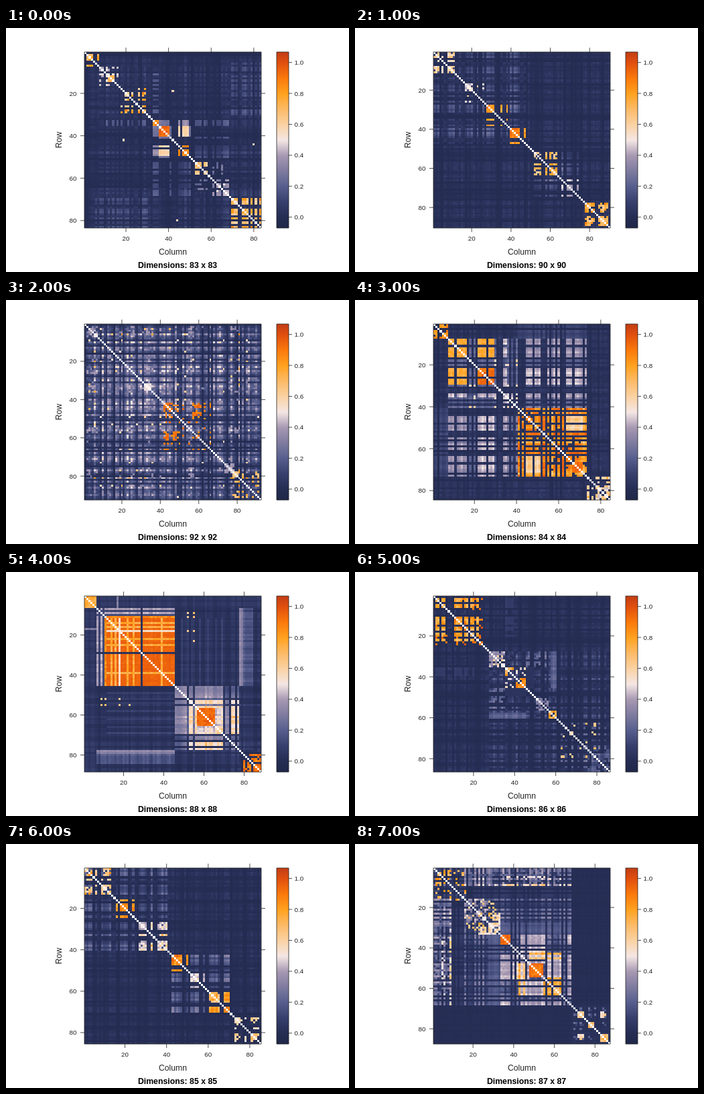
An HTML page with a canvas for the animation above (8000 ms loop, 512 by 366 pixels).

```html
<!DOCTYPE html>
<html lang="en">
<head>
<meta charset="utf-8">
<title>Matrix heatmaps</title>
<style>
html, body { margin: 0; width: 100%; height: 100%; overflow: hidden; background: #fff; }
canvas, svg { position: absolute; left: 0; top: 0; }
text { font: 9.8px "Liberation Sans", Arial, sans-serif; fill: #222; }
.mid { text-anchor: middle; }
.end { text-anchor: end; }
.name { font-size: 12.2px; }
.title { font-size: 12.3px; font-weight: bold; fill: #000; }
path { fill: none; stroke: #222; stroke-width: .8; }
</style>
</head>
<body>
<canvas id="cells" width="512" height="366"></canvas>
<svg id="axes" width="512" height="366"></svg>
<script>
const LEFT = 117, TOP = 36, SIZE = 264, HOLD = 1000;
const ctx = document.getElementById('cells').getContext('2d');
const axes = document.getElementById('axes');

// value, red, green, blue
const RAMP = [
  [-.07, 32, 39, 72], [0, 36, 44, 82], [.1, 54, 63, 108], [.2, 86, 94, 141], [.4, 166, 152, 178],
  [.5, 244, 230, 228], [.6, 250, 210, 164], [.7, 252, 187, 104], [.8, 255, 162, 32],
  [.9, 250, 122, 12], [1, 225, 80, 14], [1.07, 195, 61, 20]
];

function color(v) {
  v = Math.max(-.07, Math.min(1.07, v));
  const k = Math.max(1, RAMP.findIndex(s => v <= s[0]));
  const a = RAMP[k - 1], b = RAMP[k], t = (v - a[0]) / (b[0] - a[0]);
  return `rgb(${[1, 2, 3].map(c => Math.round(a[c] + (b[c] - a[c]) * t))})`;
}

function hash(a, b, seed) {
  const x = Math.sin(a * 12.9898 + b * 78.233 + seed * 37.719) * 43758.5453;
  return x - Math.floor(x);
}

// "2-4 7" -> [2, 3, 4, 7]
function indices(text) {
  return text.split(' ').flatMap(part => {
    const [from, to = from] = part.split('-').map(Number);
    return Array.from({ length: to - from + 1 }, (_, k) => from + k);
  });
}

// Symmetric matrix; fill() paints a block, "spread" dims it by row and column stripes.
function matrix(n, seed, build) {
  const m = Array.from({ length: n + 1 }, () => new Float32Array(n + 1));
  let layer = 0;
  const fill = (rows, cols, value, spread = .08, keep = 1, grain = .1) => {
    layer++;
    const dim = i => 1 - spread * hash(i, 0, seed);
    for (const i of indices(rows)) for (const j of indices(cols)) {
      const a = Math.min(i, j), b = Math.max(i, j);
      if (b > n || hash(a, b, seed + layer) > keep) continue;
      const noise = 1 + grain * (hash(b, a, seed + layer + .5) - .5);
      m[i][j] = m[j][i] = value * dim(i) * dim(j) * noise;
    }
  };
  const square = (set, ...rest) => fill(set, set, ...rest);
  square('1-' + n, .09, 1, 1, .6);
  build(fill, square);
  return { n, m };
}

const scenes = [
  matrix(83, 3, (fill, square) => {
    square('8-9 11-12 14 16 18 21 23 26 29 33-35 38 41 45-46 48 50 53 55 57 60 63 65 67', .17, .8);
    fill('6 8-9 12 14 16-18 20-21 23 26 28-30', '70-72 75-77 79 81 83', .24, .6);
    fill('33-35 45-46 48 50 53-54 57 60 63-64 66-68', '70-72 75-77 79 81 83', .17, .7);
    square('2-4 7', .87, .15);
    square('8-9 11-12 14 16', .55, .3, .7);
    fill('12-13', '12-14', .85, .2, .6);
    square('18 20-21 23 26 28-29', .9, .2, .75, .4);
    fill('33-35', '11 14 16 18 21 23 26 28-29', .3, .5);
    fill('33-35 41 50', '53-55 57-58 61 63-64 66-68', .34, .5);
    fill('45-49', '53-55 57-58 61 63-64 66-68', .22, .6);
    square('33-35', .95);
    square('36-40', .98, .03);
    fill('33-35 41 50', '36-40', .35, .2);
    fill('36-40', '45 47-49', .66, .1);
    fill('33-35', '45 47-49', .48, .25);
    square('45 47-49', .95, .1);
    square('53-55 57-58', .87, .2, .8);
    fill('53-58', '61 63 65', .45, .4, .5);
    square('61 63-64 66-68', .52, .3, .8);
    square('63-66', .75, .3, .4);
    square('70-72 75-77 79 81 83', .88, .25, 1, .15);
    fill('19', '42', .55, 0);
    fill('44', '80', .55, 0);
  }),
  matrix(90, 11, (fill, square) => {
    square('1-3 5 8-11 14 17-20 23 26 28-31 35 38 40-44 47', .32, .7);
    square('52-55 58 60-63 66 69-71 74', .3, .7);
    square('1-3 5 8-11', .85, .25, .8);
    square('17-20 23 26', .8, .3, .75);
    square('28-31 35 38', .92, .15);
    square('40-44 47', .95, .1);
    square('52-55 58 60-63', .88, .2, .8);
    square('66 69-71 74', .6, .3);
    square('78-82 85-89', .9, .2, .75);
  }),
  matrix(92, 7, (fill, square) => {
    square('1-92', .62, .97, 1, .6);
    square('1-8 11 13 15 17-20 22 24-26 29 31-36 39 43 45 48-52 55-60 63 66 70 73 76 79 81-84 87 90',
      .45, .75, .72, .6);
    square('2-5 7 19-20 24-26 31 33-36 40 48 55-57 62 66 71 76-80 85 90', .56, .35, .32);
    square('3 6 9 15 19-20 24 28 32 36 40 45 49 53 57 62 66 73 77 81 85 91', .86, .25, .2);
    square('42-50 52 55 57-60 63 66', .96, .08, .33);
    fill('43-44 47-48', '57-61', .97, .05, .7);
    square('3-7', .6, .3, .6);
    square('32-35', .52, .1, .8);
    square('74-78', .6, .3, .7);
    square('78-81 83 85 88 90-91', .92, .2, .45);
  }),
  matrix(84, 5, (fill, square) => {
    const upper = '8-10 12-16', middle = '22-25 27-29', lower = '45-47 49-51 55 57-58 60 64-66 68-71 73';
    fill('1-2 4-7', '41-47 49-51 53 55 57-58 60 62 64-73', .17, .5);
    fill('8-30', '34-36 38 40', .3, .5);
    fill('18 20 30', lower, .24, .4);
    fill('18 20 30', '8-10 12-16 22-25 27-29', .28, .3);
    square('1-2 4-7', .94, .15, .8);
    square(upper, .83, .08);
    fill(upper, middle, .82, .07);
    square(middle, .97, .05);
    fill('8-10 12-16 22-25 27-29', '34-35', .6, .25);
    square('18 20 30 34-36 38 40', .65, .3, .7);
    fill(upper, lower, .46, .3);
    fill(middle, lower, .52, .22);
    fill('34-36 38 40', lower, .36, .5);
    fill('34-35', lower, .55, .3);
    square('41 43 45-47 49-51 53 55 57-58 60 62 64-66 68-73', .94, .18, .9);
    fill('41 43 53 62', '45-51 55 57-60 64-73', .98, .08, .7);
    fill('45-47 49-51', '64-71', .72, .25);
    square('67-71', .96, .05);
    square('74 76 78-79 81-84', .8, .25, .8, .4);
    square('79-80 82-83', .52, .1);
  }),
  matrix(88, 9, (fill, square) => {
    fill('7-45', '46-77', .1, .8);
    fill('12-45', '49 52 54 58 62 66 69', .17, .4);
    fill('1-6', '7-88', .12, .6);
    fill('1-6', '17', .36, .2);
    square('1-6', .87, .12);
    square('7-45', .92, .1);
    square('12-45', .97, .02, 1, .03);
    fill('14 16 22 25 39', '12-45', .8, .06);
    fill('18', '12-45', .6, .1);
    fill('7 9', '9-45', .48, .2);
    fill('8 10', '7-45', .16, .2);
    fill('29', '7-45', .04);
    fill('9 11 18 20 23', '52 55', .72, .1, .6);
    fill('7-45', '78-79', .38, .15);
    fill('7-45', '80-84', .26, .5);
    fill('46-77', '78-84', .14, .7);
    square('46-69 71-72 74-75 77', .34, .45);
    square('46-51', .5, .25);
    fill('46-51 71-72', '53-54 56-69', .48, .25);
    square('53-54 56-69', .8, .2);
    square('57-65', .97, .02);
    fill('66-69', '57-65', .68, .25);
    fill('74-75 77', '53-54 56-69', .72, .3);
    fill('52 55 70', '46-77', .1, .5);
    fill('52 55', '56-69', .35, .3);
    square('80 82-83 85-88', .97, .1, .8);
    fill('80-83', '84-88', .95, .1, .5);
  }),
  matrix(86, 4, (fill, square) => {
    const lower = '63 65 68 71 74-75 78-79 81 84';
    square('2-3 5-6 11-14 16-17 19-20 22', .9, .13, 1, .2);
    fill('7 15 21 23-24', '2 5 12 16 20 23', .98, .05, .4);
    fill('36-39', '2-6 11-14 16-17 20', .1, .2);
    fill('28-31 33-35 41 43 46 50-52 55 58-60', lower, .23, .7);
    square('28-31 33-35 37-39 41-43 46-47 50-52 55 57-60', .32, .7, .85);
    square('28-35', .54, .3, .65);
    square('28 30 32 34-35', .68, .2, .35);
    fill('28-31 33-35', '46-47 50-52 55 58-60', .4, .4, .8);
    square('36-39', .87, .2, .7);
    square('41-45', .95, .1, .75);
    fill('36-39', '41-45', .65, .3, .45);
    fill('46-49', '36-45', .05);
    fill('58-60', '28-45', .28, .3);
    square('51-56', .5, .4, .5);
    square('57-60', .9, .15, .85);
    square(lower, .34, .6, .8);
    square('63-64 67-69 72 75 78-79', .8, .25, .28);
    square('76-86', .3, .6, .5);
  }),
  matrix(85, 13, (fill, square) => {
    square('1-4 6 9-13 16 18-21 24 27-30 33 36-40', .3, .6);
    square('43-47 50 52-55 58 61-65 68-70', .34, .6);
    square('1-4 6 9-13', .84, .25, .75);
    square('16 18-21 24', .93, .12);
    square('27-30 33 36-40', .75, .3, .85);
    square('43-47 50', .95, .1);
    square('52-55 58', .62, .3);
    square('61-65 68-70', .9, .2, .8);
    square('73-76 78 81-84', .85, .25, .65);
  }),
  matrix(87, 6, (fill, square) => {
    const on = '1-2 4 6 9 16 18-19 21 23 25 27-35 37-38 40 42 44-45 47-55 57-58 60-63 65 67-68';
    square('1-68', .2, .9);
    square(on, .36, .7, 1, .25);
    fill('1-9', '16 18-19 21 23 25 27-29 35 38 42 45 48-54 57 60 62', .46, .4, .85);
    fill('4 6 9', '16-68', .6, .6, .6);
    fill('5 9', '37-40 42 45 47-55', .72, .2, .8);
    fill('2-4 6 8-9 11-13 15-16', '2-4 6 8-9 11-13 15-16', .9, .2, .35);
    square('16-19 21-27', .62, .4, .65);
    square('17-18 20 23-25 28-30', .85, .2, .4);
    fill('28-33', '34-68', .25, .3);
    square('28-33', .85, .35, .7);
    fill('30-33', '21-27', .72, .2, .6);
    square('34-38', .96, .06);
    fill('34-38', '44-45 47-55', .47, .15);
    fill('39 41 43 46', '16-68', .12, .8);
    square('40 42 44-45 47', .65, .3);
    fill('40 42 44-45 47', '48-55', .7, .3);
    square('48-54', .97, .05);
    fill('44-55', '57-58 60-63', .52, .2);
    fill('43 45', '48-63', .87, .15);
    square('55 57-58 60-63', .9, .2);
    fill('67-68', '34-38 44-55 60-63', .5, .3);
    fill('56 59 64 66', '1-68', .06, .5);
    fill('10-15', '17-68', .12, .9);
    fill('1-68', '69-87', .02, .6);
    square('69-87', .05, .5);
    square('70-71 73-74 77-78 80 84-85', .3, .5, .5);
    square('72-74', .8, .2);
    square('77-79', .87, .2, .8);
    square('83-86', .85, .2, .7);
    fill('72-74', '83-85', .68, .2, .7);
  })
];

const label = (x, y, text, cls) => `<text x="${x}" y="${y}" class="${cls}">${text}</text>`;

function drawAxes(n) {
  let lines = `M${LEFT} ${TOP}h${SIZE}v${SIZE}h-${SIZE}zM404 36h18v264h-18z`, texts = '';
  for (let k = 20; k <= n; k += 20) {
    const p = (k - .5) / n * SIZE, x = LEFT + p, y = TOP + p;
    lines += `M${x} 36v-6.5M${x} 300v6M117 ${y}h-6M381 ${y}h6`;
    texts += label(x, 318.5, k, 'mid') + label(105.5, y + 3.5, k, 'end');
  }
  for (let k = 0; k <= 5; k++) {
    const y = 283.7 - k * 46.4;
    lines += `M422 ${y}h5`;
    texts += label(430.5, y + 3.5, (k / 5).toFixed(1), '');
  }
  axes.innerHTML = `<path d="${lines}"/>${texts}` +
    label(249, 339.5, 'Column', 'mid name') +
    `<g transform="translate(82.5 168) rotate(-90)">${label(0, 0, 'Row', 'mid name')}</g>` +
    label(256, 360, `Dimensions: ${n} x ${n}`, 'mid title');
}

function drawCells({ n, m }) {
  const edge = k => Math.round(k / n * SIZE);
  ctx.clearRect(0, 0, 512, 366);
  for (let i = 1; i <= n; i++) for (let j = 1; j <= n; j++) {
    const x = edge(j - 1), y = edge(i - 1);
    ctx.fillStyle = i === j ? '#fff' : color(m[i][j]);
    ctx.fillRect(LEFT + x, TOP + y, edge(j) - x, edge(i) - y);
  }
  for (let y = 0; y < SIZE; y++) {
    ctx.fillStyle = color(1.07 - y / SIZE * 1.14);
    ctx.fillRect(404, TOP + y, 18, 1);
  }
}

let shown = -1;
function tick() {
  const k = Math.floor(performance.now() / HOLD) % scenes.length;
  if (k !== shown) {
    shown = k;
    drawCells(scenes[k]);
    drawAxes(scenes[k].n);
  }
  requestAnimationFrame(tick);
}
tick();
</script>
</body>
</html>
```
